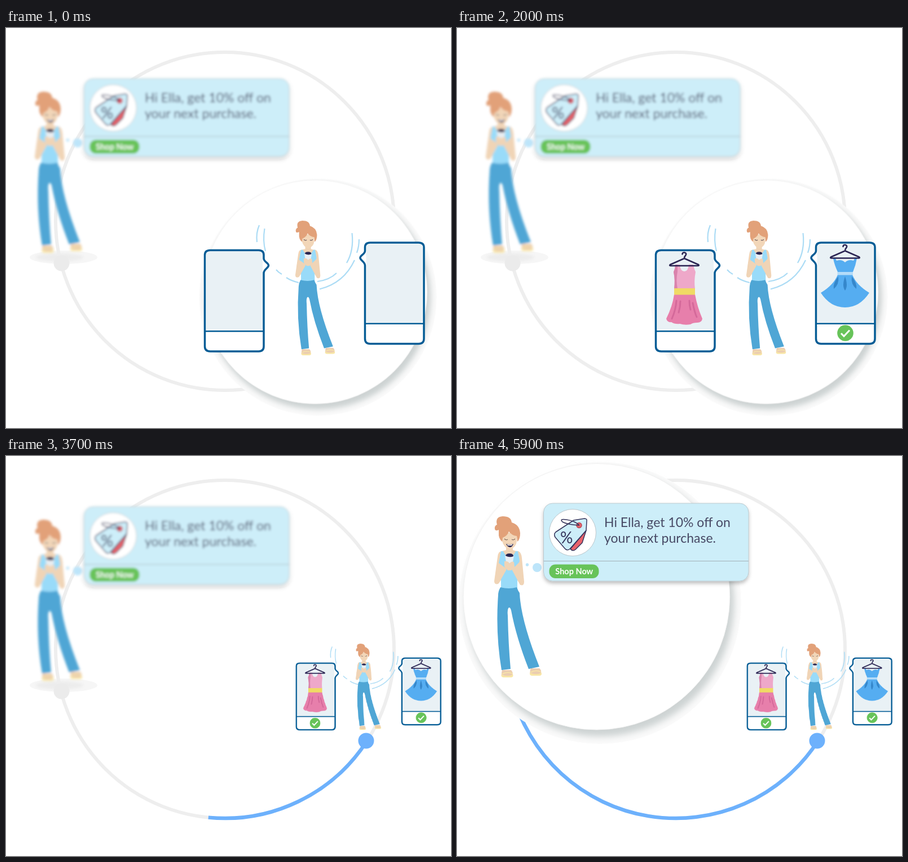
An HTML page for the animation above (8 s loop, 789 by 710 pixels).

```html
<!DOCTYPE html>
<html lang="en">
<head>
<meta charset="utf-8">
<title>Personal offer</title>
<style>
html, body { margin: 0; width: 100%; height: 100%; overflow: hidden; background: #fff; }
svg { display: block; width: 100%; height: 100%; }
text { font-family: Lato, sans-serif; }

.anim, .anim-arc { animation: 8s step-end infinite; }
.blue-dress { animation-name: at1000; }
.blue-check { animation-name: at1500; }
.pink-dress { animation-name: at2000; }
.pink-check { animation-name: at2500; }
.track { animation-name: at3000; }
.end-dot { animation-name: at4100; }
.close-up { animation-name: at5100; }
.offer { animation-name: at5900; }
.lens { animation-name: until3000; }
.faded { animation-name: until5100; }
.calm { animation-name: until5900; }
.scene { animation-name: shrinkScene; }
.shopper { animation-name: shrinkShopper; }
.anim-arc { animation-name: draw; animation-timing-function: linear; stroke-dasharray: 132.8 400; }

@keyframes at1000 { 0% { opacity: 0 } 12.5%, 100% { opacity: 1 } }
@keyframes at1500 { 0% { opacity: 0 } 18.75%, 100% { opacity: 1 } }
@keyframes at2000 { 0% { opacity: 0 } 25%, 100% { opacity: 1 } }
@keyframes at2500 { 0% { opacity: 0 } 31.25%, 100% { opacity: 1 } }
@keyframes at3000 { 0% { opacity: 0 } 37.5%, 100% { opacity: 1 } }
@keyframes at4100 { 0% { opacity: 0 } 51.25%, 100% { opacity: 1 } }
@keyframes at5100 { 0% { opacity: 0 } 63.75%, 100% { opacity: 1 } }
@keyframes at5900 { 0% { opacity: 0 } 73.75%, 100% { opacity: 1 } }
@keyframes until3000 { 0% { opacity: 1 } 37.5%, 100% { opacity: 0 } }
@keyframes until5100 { 0% { opacity: 1 } 63.75%, 100% { opacity: 0 } }
@keyframes until5900 { 0% { opacity: 1 } 73.75%, 100% { opacity: 0 } }
@keyframes shrinkScene {
  0% { transform: none }
  37.5%, 100% { transform: translate(282.4px, 107.7px) scale(.659) }
}
@keyframes shrinkShopper {
  0% { transform: translate(457.8px, 252.5px) scale(.836) }
  37.5%, 100% { transform: translate(584.7px, 275.8px) scale(.535) }
}
/* seven steps, 100 ms apart, the first one at 3500 ms */
@keyframes draw {
  0% { stroke-dashoffset: 122.7 }
  43.75% { stroke-dashoffset: 122.7; animation-timing-function: steps(7, start) }
  52.5%, 100% { stroke-dashoffset: 0 }
}
</style>
</head>
<body>
<svg viewBox="0 0 789 710" preserveAspectRatio="none">
<defs>
  <filter id="blur" x="-20%" y="-20%" width="140%" height="140%"><feGaussianBlur stdDeviation="2.3"/></filter>
  <filter id="soft" x="-20%" y="-20%" width="140%" height="140%"><feGaussianBlur stdDeviation="6"/></filter>
  <filter id="drop" x="-10%" y="-10%" width="120%" height="130%">
    <feDropShadow dx="0" dy="4" stdDeviation="3" flood-color="#000" flood-opacity=".25"/>
  </filter>

  <g id="disc">
    <circle cx="6" cy="11" r="250" fill="#fafafa"/>
    <circle cx="6" cy="10" r="238" fill="#cdd3d3" filter="url(#soft)"/>
    <circle r="236.3" fill="#fff" stroke="#efefef" stroke-width=".8"/>
  </g>

  <g id="woman">
    <path fill="#f0d4b6" d="M87 158H99V167Q104 169 109 169Q114 171 115 181L119 223Q119 231 113 229L98 207 92 190 88 207 73 227Q66 229 66 222L72 179Q73 169 79 169L87 167Z"/>
    <path fill="#99dbf9" d="M78 169H82Q85 177 93 180Q101 177 104 169H108L111 186 107 204V236H78V207L74 190Z"/>
    <path fill="#f0d4b6" d="M74 190L85 198 91 187 87 203 74 226 67 225 70 195ZM112 187L102 197 95 187 98 203 112 229 118 227 115 194Z"/>
    <path fill="#e9eef2" d="M85 177H101L99 188Q93 193 87 188Z"/>
    <path fill="#f0d4b6" d="M84 187Q91 186 93 191Q96 186 101 188L102 197 96 203H90L84 196Z"/>
    <path fill="#2b2750" d="M86 177Q87 173 93 173Q100 173 100 178Q93 181 86 177Z"/>
    <path fill="#f2d6b8" d="M79 136H106V151Q105 162 94 166Q83 163 80 151Z"/>
    <path fill="#e2a179" d="M74 131Q66 135 67 126Q69 122 71 122Q67 108 81 107Q96 107 97 118Q111 122 112 137Q112 148 107 152L106 142Q97 141 92 134Q89 142 81 145L80 152Q73 146 74 136Z"/>
    <path fill="none" stroke="currentColor" stroke-width="1.3" d="M84 147Q87 150 90 148M97 148Q100 150 103 147"/>
    <path fill="#4fa6d5" d="M77 233Q92 237 106 233Q108 239 111 243Q113 291 146 374L127 378Q105 322 96 274Q94 267 91 270Q89 274 90 283Q91 333 95 378L79 380Q68 315 73 247Q73 240 77 233Z"/>
    <g id="shoe">
      <path fill="#f8e6a6" d="M79 387Q89 384 99 387Q101 393 95 393H82Q77 392 79 387Z"/>
      <path fill="#ebcdb0" d="M80 380H96Q101 386 97 389Q88 392 79 388Q79 383 80 380Z"/>
      <path fill="none" stroke="#f8e6a6" stroke-width="1.5" d="M80 387Q89 382 98 386"/>
    </g>
    <use href="#shoe" x="50.5" y="-3"/>
  </g>

  <g id="smile">
    <path fill="#2b2750" d="M87 156Q93 158 100 156Q98 162 93.500 162Q89 161 87 156Z"/>
    <path fill="#fff" d="M88.500 156.800Q93 158 98.500 156.800L97.500 158.500Q93 159.500 89.500 158.500Z"/>
  </g>

  <g id="message">
    <circle cx="142" cy="198" r="8" fill="#bde5fa"/>
    <circle cx="124.500" cy="193" r="2.700" fill="#bde5fa"/>
    <rect x="153.500" y="84" width="363.500" height="138" rx="16" fill="#cdeef9" stroke="#b3bfc4" stroke-width=".8" filter="url(#drop)"/>
    <path stroke="#a3b0b8" d="M153.500 186.500H517"/>
    <circle cx="205" cy="136" r="41.500" fill="#fff" stroke="#bcc7cc"/>
    <g stroke="#35355c" stroke-width="1.500" stroke-linejoin="round">
      <path fill="#e9636b" d="M229 132L222 154 210 166Q205 170 201 165Z"/>
      <path fill="#cdeef9" d="M207 114L226 111Q231 111 230 116L229 132 200 165Q195 169 191 164L174 144Q171 139 175 135Z"/>
      <circle cx="216.500" cy="123" r="4.500" fill="#e9636b" stroke="#b94756"/>
      <path fill="none" d="M217 123Q196 122 187 117Q181 111 194 113Q209 115 217 123"/>
    </g>
    <text x="183" y="155" font-size="28" fill="#35355c">%</text>
    <g font-size="23" fill="#474965">
      <text x="261" y="126">Hi Ella, get 10% off on</text>
      <text x="261" y="154">your next purchase.</text>
    </g>
    <rect x="163.500" y="192.500" width="88" height="24.500" rx="11" fill="#67c359"/>
    <text x="207.800" y="209.800" font-size="14.500" font-weight="700" text-anchor="middle" fill="#fff">Shop Now</text>
  </g>

  <g id="phone">
    <path fill="#fff" d="M362 394.500H448Q457 394.500 457 403V409C457 415 465.500 417 465.500 421.500S457 428 457 435V565Q457 574 448 574H362Q352.500 574 352.500 565V403Q352.500 394.500 362 394.500Z"/>
    <rect x="355" y="397" width="100" height="140" rx="5" fill="#e9f1f5"/>
    <path fill="none" stroke="#045c95" stroke-width="3.500" d="M362 394.500H448Q457 394.500 457 403V409C457 415 465.500 417 465.500 421.500S457 428 457 435V565Q457 574 448 574H362Q352.500 574 352.500 565V403Q352.500 394.500 362 394.500Z"/>
    <path stroke="#045c95" stroke-width="2.500" d="M353 538.300H457"/>
  </g>

  <g id="hanger" fill="none" stroke="#2b2553" stroke-width="2.600" stroke-linecap="round" stroke-linejoin="round">
    <path d="M399.500 401.500Q400 398 403.500 398.500Q408 400 405 404Q403 406 403 409L378 420Q376 422 379 422H427Q430 422 428 420L403 409"/>
  </g>

  <g id="check">
    <circle r="14.300" fill="#67c359"/>
    <path fill="none" stroke="#fff" stroke-width="3" d="M-7.500 .5L-2.500 5.500 7.500 -5"/>
  </g>
</defs>

<ellipse class="anim faded" cx="102" cy="407" rx="60" ry="12" fill="#f6f6f6"/>
<ellipse class="anim faded" cx="95" cy="407" rx="42" ry="7" fill="#ececec" filter="url(#blur)"/>
<circle cx="388" cy="343" r="300" fill="none" stroke="#eee" stroke-width="6"/>
<circle cx="98.500" cy="417.500" r="14" fill="#ebebeb"/>

<g class="anim track" fill="#6db1fc">
  <path class="anim-arc" pathLength="132.8" fill="none" stroke="#6db1fc" stroke-width="6.500" d="M639.900 506A300 300 0 0 1 97.300 417.100"/>
  <circle cx="638.500" cy="505.500" r="14"/>
  <circle class="anim end-dot" cx="98.500" cy="417.500" r="14"/>
</g>

<g class="anim faded">
  <g transform="translate(-15 6)" color="#777" filter="url(#blur)">
    <use href="#woman"/>
    <use href="#smile"/>
    <use href="#message"/>
  </g>
</g>

<g class="anim lens"><use href="#disc" transform="translate(548 468.500) scale(.841)"/></g>

<g class="anim scene">
  <g fill="none" stroke="#acdcf5" stroke-width="2.200">
    <path d="M449 350Q443 364 445 380M458.500 356Q455 378 460 396M479 429Q483 434 489 437M497 443Q506 449 519 452"/>
    <path d="M613.500 364Q617 395 604 417M626 375Q626 388 622 399M618 412Q599 453 556 463.500M586 435Q574 447 552 450"/>
  </g>
  <use href="#phone"/>
  <use href="#phone" transform="matrix(-1 0 0 1 1093.500 -13.500)"/>

  <g class="anim pink-dress">
    <path fill="#eea8c9" d="M387 420H395Q396 432 403 432Q410 432 411 420H419Q420 427 423 433Q420 449 422 463H385Q387 447 384 433Q387 427 387 420Z"/>
    <path fill="#d983ac" d="M387 420H391V432Q388 448 391 463H385Q387 447 384 433Q387 427 387 420Z"/>
    <path fill="#e77fab" d="M385 473H422Q426 495 435 516Q434 523 426 523Q418 523 414 526Q404 528 395 525Q386 526 380 522Q373 523 371 516Q382 494 385 473Z"/>
    <path fill="none" stroke="#d4699a" stroke-width="3" stroke-linecap="round" d="M389 484Q388 500 381 516M396 485Q396 495 393 505M412 484Q412 492 414 500M418 488Q421 504 425 513"/>
    <path fill="#f0da65" d="M385 462H422V473.500H385Z"/>
    <use href="#hanger"/>
  </g>

  <g class="anim blue-dress">
    <path fill="#55adf1" d="M670 407L673 413Q682 410 688 416Q694 410 703 413L706 407 709 409Q707 421 702 433H675Q669 420 667 409Z"/>
    <path fill="#55adf1" d="M675 438H701Q708 456 731 470Q714 496 688 496T645 470Q668 456 675 438Z"/>
    <path fill="#3587cb" d="M676 441Q678 455 668 463Q666 454 676 441ZM688 441Q694 458 688 466Q682 458 688 441ZM700 441Q710 454 708 463Q698 455 700 441Z"/>
    <path fill="#b4dcf9" d="M674.500 433H702V438.500H674.500Z"/>
    <use href="#hanger" x="285" y="-13.500"/>
  </g>
  <g class="anim pink-check"><use href="#check" x="403" y="556"/></g>
  <g class="anim blue-check"><use href="#check" x="688.500" y="541.500"/></g>
</g>
<g class="anim shopper" color="#5a4a52"><use href="#woman"/></g>

<g class="anim close-up">
  <use href="#disc" x="247.500" y="249.700"/>
  <use href="#woman" color="#8a7568"/>
  <g class="anim calm" fill="none" stroke="#4a2c47" stroke-width="1.600">
    <path d="M84 147Q87 150 90 148M97 148Q100 150 103 147M89.500 157.500Q93 159 97.500 157.500"/>
  </g>
</g>
<g class="anim offer">
  <use href="#smile"/>
  <use href="#message"/>
</g>
</svg>
</body>
</html>
```
